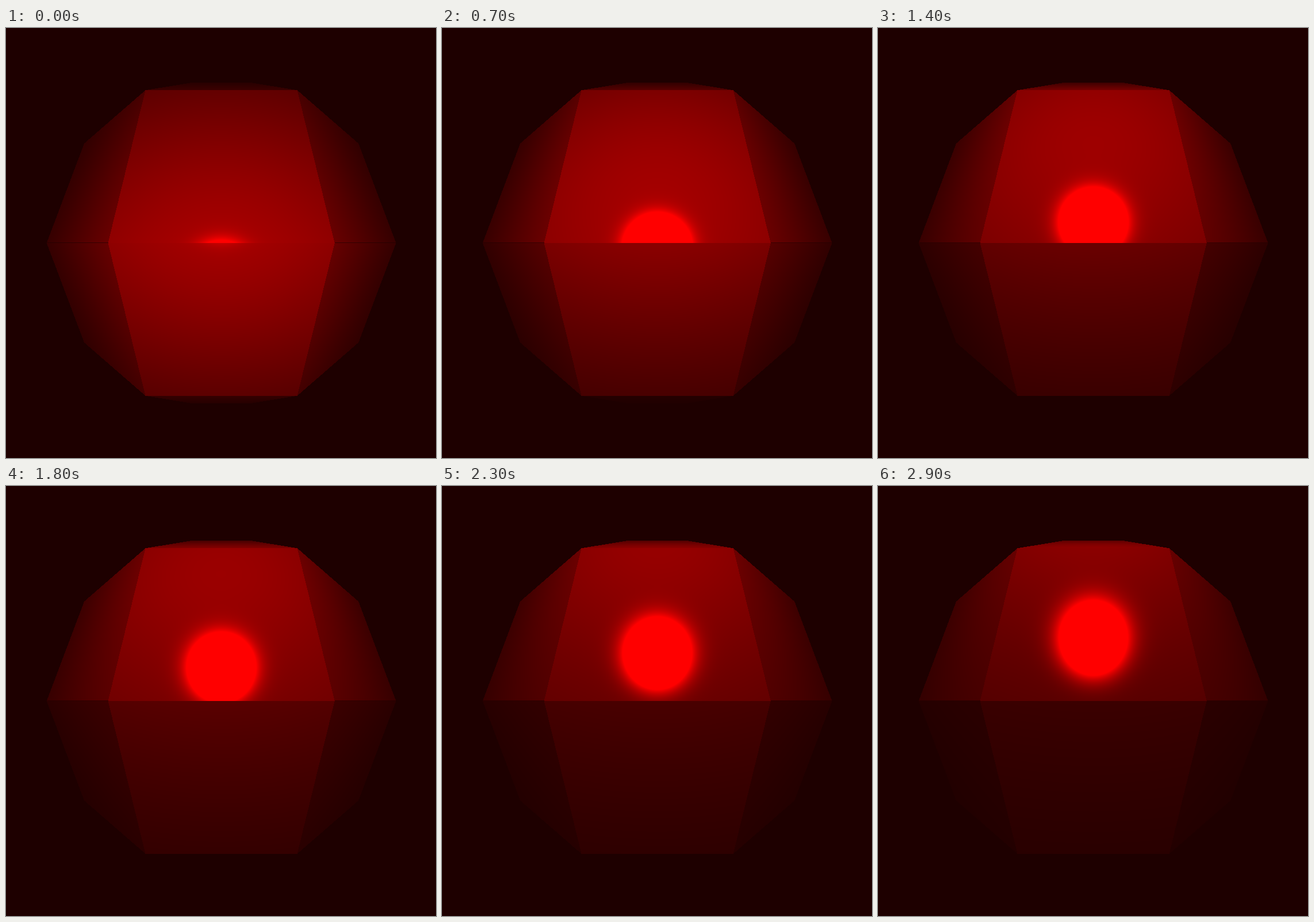
These frames come from a looping animation (748x748 px, 3 s). An HTML page with a canvas:

```html
<!DOCTYPE html>
<html lang="en">
<head>
<meta charset="utf-8">
<title>Lit facets</title>
<style>
  html, body { margin: 0; width: 100%; height: 100%; overflow: hidden; background: #1e0000; }
  canvas { display: block; width: 748px; height: 748px; }
</style>
</head>
<body>
<canvas id="stage" width="748" height="748"></canvas>
<script>
const SIZE = 748, CX = 374.6, CY = 374;
const FOCAL = 229.8, CAMERA_Z = 1.25;
const STEP_MS = 100, STEPS = 30;
const LON = 2 * Math.PI / 13, LAT = Math.PI / 7;
const AMBIENT = 30, DIFFUSE = 113.5, SPECULAR = 850, SHININESS = 27;
const LIGHT_Z = 1.44, LIGHT_RISE = 0.0243;

const ctx = document.getElementById('stage').getContext('2d');
const image = ctx.createImageData(SIZE, SIZE);
const samples = [];

const sub = (a, b) => a.map((v, i) => v - b[i]);
const dot = (a, b) => a[0] * b[0] + a[1] * b[1] + a[2] * b[2];
const unit = a => a.map(v => v / Math.sqrt(dot(a, a)));
const cross = (a, b) => [
  a[1] * b[2] - a[2] * b[1],
  a[2] * b[0] - a[0] * b[2],
  a[0] * b[1] - a[1] * b[0]
];

function vertex(col, row) {
  const lon = (col - 0.5) * LON, lat = row * LAT;
  return [Math.sin(lon) * Math.cos(lat), Math.sin(lat), Math.cos(lon) * Math.cos(lat)];
}

function project([x, y, z]) {
  const k = FOCAL / (CAMERA_Z - z);
  return [CX + x * k, CY - y * k];
}

function inside(poly, x, y) {
  return poly.every(([ax, ay], i) => {
    const [bx, by] = poly[(i + 1) % poly.length];
    return (bx - ax) * (y - ay) - (by - ay) * (x - ax) <= 0;
  });
}

// Stores the surface point, normal and mirrored view ray of every visible pixel.
function addFace(col, row) {
  const corners = [vertex(col, row), vertex(col + 1, row), vertex(col + 1, row + 1), vertex(col, row + 1)];
  const normal = unit(cross(sub(corners[1], corners[0]), sub(corners[3], corners[0])));
  const camera = [0, 0, CAMERA_Z];
  const reach = dot(normal, sub(corners[0], camera));
  if (reach >= 0) return;

  const poly = corners.map(project);
  const xs = poly.map(p => p[0]), ys = poly.map(p => p[1]);
  for (let y = Math.floor(Math.min(...ys)); y <= Math.max(...ys); y++) {
    for (let x = Math.floor(Math.min(...xs)); x <= Math.max(...xs); x++) {
      if (!inside(poly, x + 0.5, y + 0.5)) continue;
      const ray = [(x + 0.5 - CX) / FOCAL, (CY - y - 0.5) / FOCAL, -1];
      const t = reach / dot(normal, ray);
      const dir = unit(ray), turn = 2 * dot(normal, dir);
      const seam = col !== 0 && y === 373 ? 0.35 : 1;
      samples.push(
        (y * SIZE + x) * 4, seam,
        ray[0] * t, ray[1] * t, CAMERA_Z - t,
        ...normal,
        ...dir.map((v, i) => v - turn * normal[i])
      );
    }
  }
}

for (let row = -3; row < 3; row++) {
  for (let col = -2; col <= 2; col++) addFace(col, row);
}
const field = Float32Array.from(samples);
const STRIDE = 11;

for (let i = 0; i < image.data.length; i += 4) {
  image.data[i] = AMBIENT;
  image.data[i + 3] = 255;
}

function draw(step) {
  const lightY = LIGHT_RISE * (step + 1);
  for (let i = 0; i < field.length; i += STRIDE) {
    const lx = -field[i + 2], ly = lightY - field[i + 3], lz = LIGHT_Z - field[i + 4];
    const d2 = lx * lx + ly * ly + lz * lz, d = Math.sqrt(d2);
    const facing = (lx * field[i + 5] + ly * field[i + 6] + lz * field[i + 7]) / d;
    let glow = 0;
    if (facing > 0) {
      const mirror = (lx * field[i + 8] + ly * field[i + 9] + lz * field[i + 10]) / d;
      glow = DIFFUSE * facing;
      if (mirror > 0.7) glow += SPECULAR * Math.pow(mirror, SHININESS);
    }
    image.data[field[i]] = AMBIENT + field[i + 1] * glow / (0.6 + d2);
  }
  ctx.putImageData(image, 0, 0);
}

let shown = -1;
const start = performance.now();
function tick() {
  const step = Math.floor((performance.now() - start) / STEP_MS) % STEPS;
  if (step !== shown) draw(shown = step);
  requestAnimationFrame(tick);
}
tick();
</script>
</body>
</html>
```
